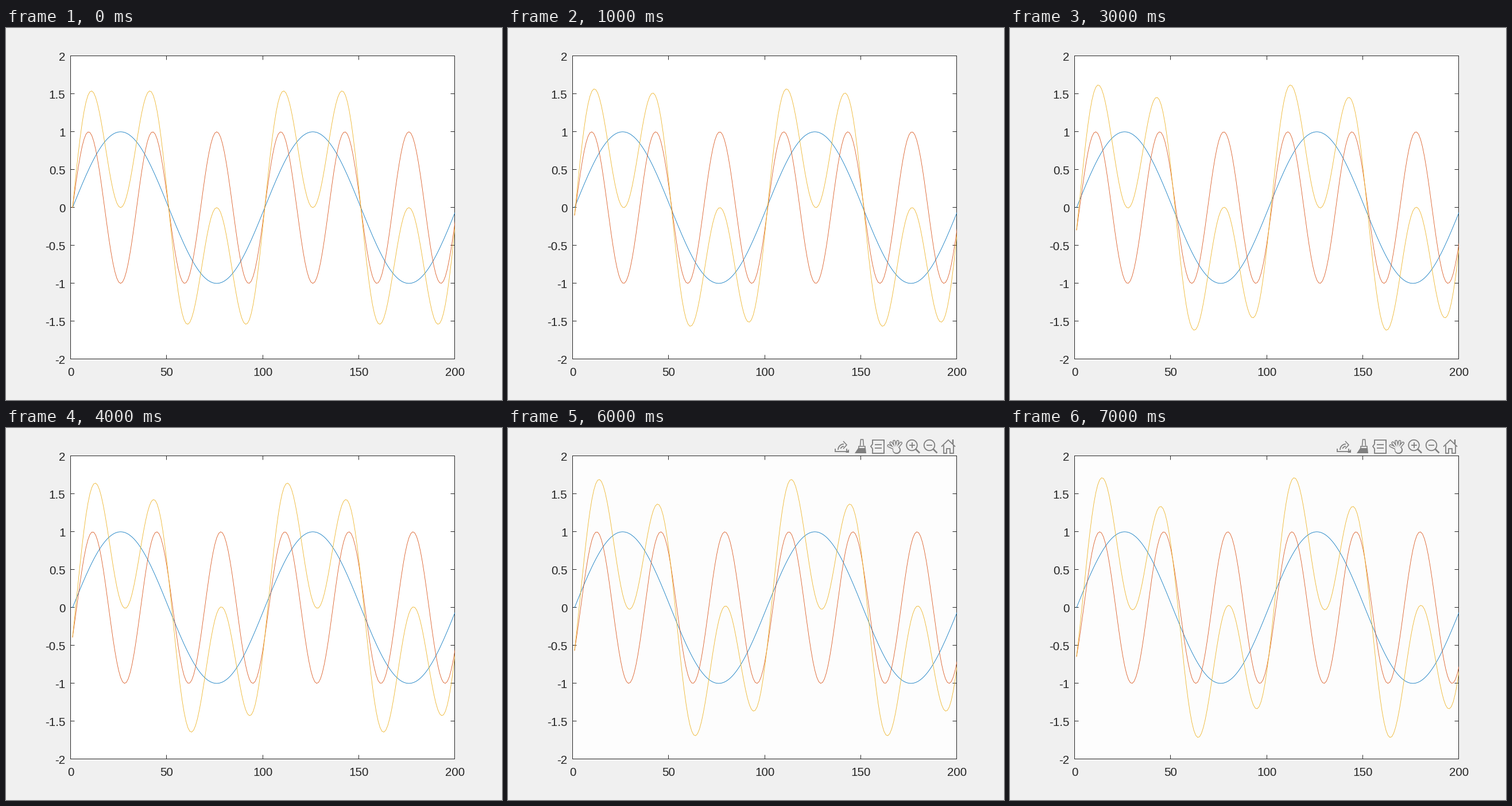
Write a matplotlib script that moves like this. It is 864 px wide and 648 px high and loops after 8 s.

```python
import numpy as np
import matplotlib.pyplot as plt
from matplotlib.animation import FuncAnimation

W, H = 864, 648
FRAMES, STEP_MS = 8, 1000
TOOLBAR_START = 5
LEFT, TOP, AX_W, AX_H = 112.6, 48.8, 669.6, 528.1
INK, GREY, BACK = "#262626", "#7f7f7f", "#f0f0f0"
BLUE, RED, YELLOW = "#0072bd", "#d95319", "#edb120"

# At 72 dpi one point equals one pixel.
fig = plt.figure(figsize=(W / 72, H / 72), dpi=72, facecolor=BACK)


def axes_at(x, y, w, h):
    return fig.add_axes([x / W, 1 - (y + h) / H, w / W, h / H])


# The frame sits on whole pixels, the curves keep their exact place.
frame = axes_at(int(LEFT), int(TOP), int(AX_W), int(AX_H))
ax = axes_at(LEFT, TOP, AX_W, AX_H)
ax.axis("off")
for a in (frame, ax):
    a.set(xlim=(0, 200), ylim=(-2, 2))
frame.set_xticks(np.arange(0, 201, 50))
frame.set_yticks(np.arange(-2, 2.1, 0.5))
frame.tick_params(direction="in", length=6.7, width=1, color=INK, top=True,
                  right=True, labelleft=False, labelbottom=False)
for spine in frame.spines.values():
    spine.set(color=INK, linewidth=1)

# Overlay in pixels, y pointing down.
page = axes_at(0, 0, W, H)
page.set(xlim=(0, W), ylim=(H, 0))
page.axis("off")


def label(x, y, text, align):
    page.text(x, y, text, ha=align, va="baseline", color=INK,
              family="Liberation Sans", size=20.6)


for v in frame.get_xticks():
    label(LEFT + v / 200 * AX_W, 606.5, f"{v:g}", "center")
for v in frame.get_yticks():
    label(103.5, TOP + (2 - v) / 4 * AX_H + 8, f"{v:g}", "right")

n = np.arange(1, 201)
angle = 2 * np.pi * (n - 1) / 100
base = np.sin(angle)
ax.plot(n, base, color=BLUE, lw=0.8)
third, = ax.plot([], [], color=RED, lw=0.8)
total, = ax.plot([], [], color=YELLOW, lw=0.8)

MID = 32  # centre line of the toolbar
toolbar = []


def stroke(xs, ys, lw=1.8, color=GREY, cap="butt"):
    toolbar.extend(page.plot(xs, ys, color=color, lw=lw,
                             solid_joinstyle="miter", solid_capstyle=cap))


def arc(cx, cy, r, start, end):
    t = np.radians(np.linspace(start, end, 40))
    stroke(cx + r * np.cos(t), cy + r * np.sin(t))


def mirror(cx, dx, ys, lw=1.8):
    """Stroke a half outline and its reflection about x = cx."""
    dx, ys = np.array(dx), np.array(ys)
    stroke(np.r_[cx - dx, cx + dx[::-1]], np.r_[ys, ys[::-1]], lw)


def fill(xs, ys):
    toolbar.extend(page.fill(xs, ys, fc=GREY, ec="none"))


def export_icon(x):
    mirror(x - 1.5, [10, 10], [36, 41])
    arc(x + 4, 38, 10, 180, 270)
    arc(x + 4, 38, 6, 200, 270)
    stroke([x + 3, x + 9, x + 3], [23, 29.5, 36], 1.6)
    fill([x + 13, x + 13, x + 7], [37, 42.5, 42.5])


def brush_icon(x):
    mirror(x, [3, 2], [31, 20], 1.6)
    mirror(x, [5.5, 5.5], [35, 32], 1.6)
    fill([x - 6.5, x + 6.5, x + 7.5, x - 12.5], [35, 35, 44, 44])


def datatip_icon(x):
    mirror(x + 1, [10, 10], [26, 20.5])
    mirror(x + 1, [10, 10], [38, 43.5])
    stroke([x + 11] * 2, [20.5, 43.5])
    stroke([x - 9, x - 9, x - 12, x - 9, x - 9], MID + np.arange(-8, 9, 4))
    for y in (29, 35):
        stroke([x - 5, x + 7], [y, y])


def hand_icon(x):
    # A wide grey pass under a narrow pale one leaves the outline.
    for width, color in ((5.2, GREY), (2.2, BACK)):
        for turn in np.radians(np.linspace(-64, 40, 5)):
            stroke([x, x + 14 * np.sin(turn)], [37, 37 - 14 * np.cos(turn)],
                   width, color, "round")
        stroke([x, x + 1], [38, 38], width + 8, color, "round")


def zoom_icon(x, plus):
    y = MID - 2
    arc(x, y, 9.3, 0, 360)
    stroke([x + 6.3, x + 13.5], [y + 6.3, y + 13.5], 2.6)
    stroke([x - 5, x + 5], [y, y])
    if plus:
        stroke([x, x], [y - 5, y + 5])


def home_icon(x):
    mirror(x, [12, 0], [32.5, 20.8])
    mirror(x, [8.5, 8.5, 3, 3], [30, 43.5, 43.5, 35.5])
    stroke([x + 7.8] * 2, [20, 28], 2.4)


export_icon(581)
brush_icon(616.5)
datatip_icon(644)
hand_icon(675.5)
zoom_icon(703.5, True)
zoom_icon(734, False)
home_icon(767)


def update(i):
    wave = np.sin(3 * angle - 0.1 * i)
    third.set_data(n, wave)
    total.set_data(n, base + wave)
    hovered = i >= TOOLBAR_START
    frame.set_facecolor("#fdfdfd" if hovered else "white")
    for part in toolbar:
        part.set_visible(hovered)
    return [third, total, *toolbar]


anim = FuncAnimation(fig, update, frames=FRAMES, interval=STEP_MS,
                     init_func=lambda: update(0), repeat=True, repeat_delay=0)
plt.show()
```
